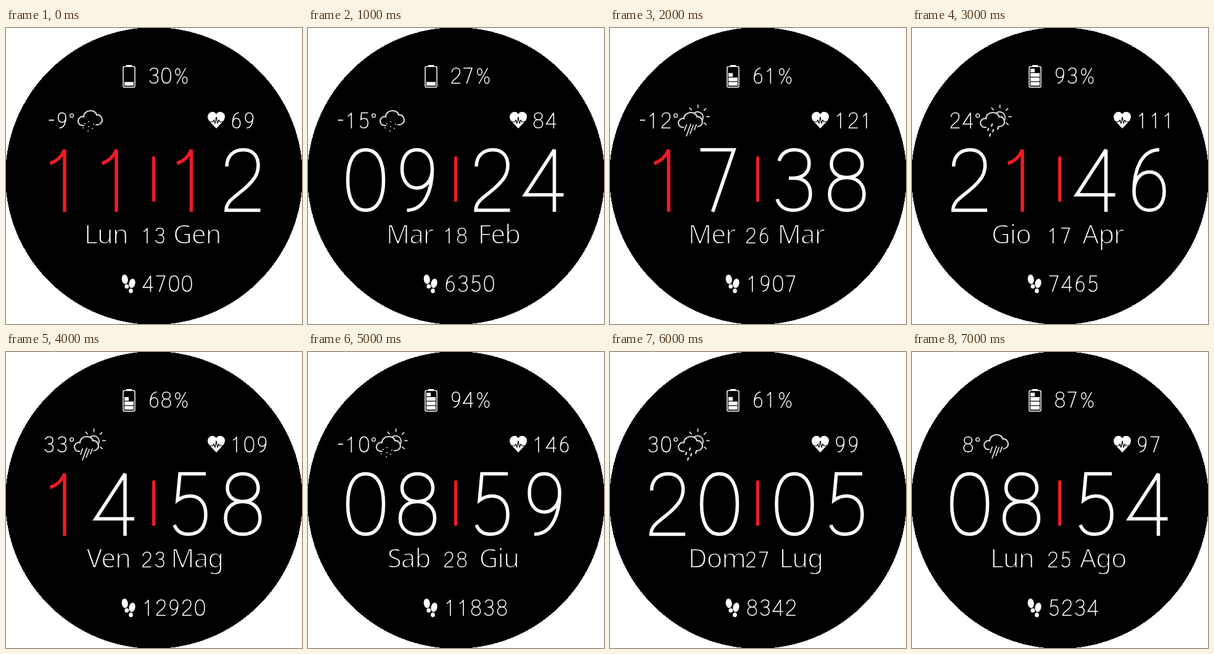
Recreate the animation shown at these times as an HTML page with a canvas. Size 480 by 480 pixels, loop 8 s.

```html
<!DOCTYPE html>
<html lang="it">
<head>
<meta charset="utf-8">
<style>
html, body { margin: 0; width: 100%; height: 100%; overflow: hidden; background: #fff; }
canvas { display: block; width: 480px; height: 480px; }
</style>
</head>
<body>
<canvas id="face" width="480" height="480"></canvas>
<script>
const ctx = document.getElementById('face').getContext('2d');
const WHITE = '#fff', BLACK = '#000', RED = '#ed1c24', GREY = '#d6d6d6';
const HOLD = 1000, RADIUS = 241;

// Thin digits, centred on x = 0, from y = 0 to y = 98
const DIGITS = [
  'M0 0C-20 0-29 20-29 49S-20 98 0 98 29 78 29 49 20 0 0 0Z',
  'M-22 22C-12 19-3 11 1.5 0V100.5',
  'M-26 27C-26 10-15 0 1 0C17 0 25 11 25 25C25 40 18 49 4 62C-12 76-27 83-27 98H28.5',
  'M-25 18C-21 6-12 0 0 0C15 0 24 9 24 22C24 37 14 46-2 46H-9H-1C16 46 26 55 26 71C26 88 15 98-2 98C-16 98-24 92-28 80',
  'M15.5 100.5V0L-32 73H30.5',
  'M25 0H-17L-21 43C-14 38-8 36-1 36C16 36 25 48 25 66C25 86 15 98-3 98C-15 98-22 93-26 83',
  'M-24 67C-24 86-14 98 1 98S25 86 25 67 15 36 1 36-24 48-24 67C-24 33-12 0 17 0',
  'M-31 0H23.5L-11 100.5',
  'M0 45C-15 45-25 36-25 23S-15 0 0 0 25 10 25 23 15 45 0 45C-18 45-28 57-28 72S-18 98 0 98 28 87 28 72 18 45 0 45Z',
  'M24 31C24 12 14 0-1 0S-25 12-25 31-15 62-1 62 24 50 24 31C24 65 12 98-17 98'
].map(d => new Path2D(d));

const CLOUD = new Path2D('M126 158C117 159 115 150 119 146 121 144 123 143 126 144 126 132 145 131 147 141 155 140 158 150 154 154 152 157 149 157 146 157');
const HEART = new Path2D('M341 163L329 150C324 142 330 136 335 136 338 136 340 138 341 140 342 138 344 136 347 136 353 136 358 142 353 150Z');
const PULSE = new Path2D('M329 152H335.5L337 149 339 155 341 144 343 155 345 149 346.5 152H353');
const RAIN = new Path2D('M130 154L127 163M137 153L130 172M141 155L136 168M146 154L143 162');
const DROPS = new Path2D('M136 153L135 156M130 160L129 163M138 162L137 165M146 158L145 161M133 169L132 172');
const SNOW = new Path2D('M128 155h.1M134 152h.1M142 156h.1M125 162h.1M134 160h.1M140 163h.1M133 167h.1');

const scene = (time, day, date, month, battery, temp, pulse, steps, sun, fall) =>
  ({ time, day, date, month, battery, temp, pulse, steps, sun, fall });

const SCENES = [
  scene('1112', 'Lun', 13, 'Gen', 30, -9, 69, 4700, false, SNOW),
  scene('0924', 'Mar', 18, 'Feb', 27, -15, 84, 6350, false, SNOW),
  scene('1738', 'Mer', 26, 'Mar', 61, -12, 121, 1907, true, RAIN),
  scene('2146', 'Gio', 17, 'Apr', 93, 24, 111, 7465, true, DROPS),
  scene('1458', 'Ven', 23, 'Mag', 68, 33, 109, 12920, true, RAIN),
  scene('0859', 'Sab', 28, 'Giu', 94, -10, 146, 11838, true, SNOW),
  scene('2005', 'Dom', 27, 'Lug', 61, 30, 99, 8342, true, DROPS),
  scene('0854', 'Lun', 25, 'Ago', 87, 8, 97, 5234, false, RAIN)
];

function stroke(path, color, width) {
  ctx.strokeStyle = color;
  ctx.lineWidth = width;
  ctx.stroke(path);
}

function ellipse(x, y, rx, ry, tilt = 0) {
  ctx.beginPath();
  ctx.ellipse(x, y, rx, ry, tilt, 0, Math.PI * 2);
}

function line(x1, y1, x2, y2, color, width) {
  ctx.beginPath();
  ctx.moveTo(x1, y1);
  ctx.lineTo(x2, y2);
  ctx.strokeStyle = color;
  ctx.lineWidth = width;
  ctx.stroke();
}

function digit(n, x, y, scale, weight, color = WHITE) {
  ctx.save();
  ctx.translate(x, y);
  ctx.scale(scale, scale);
  stroke(DIGITS[n], color, weight / scale);
  ctx.restore();
}

function number(value, x, y, pitch = 21, scale = 0.25) {
  [...String(value)].forEach((n, i) => digit(n, x + i * pitch, y, scale, 1.6));
}

// Row by row, so that the rim stays hard-edged
function drawDisc() {
  ctx.fillStyle = WHITE;
  ctx.fillRect(0, 0, 480, 480);
  ctx.fillStyle = BLACK;
  for (let y = 0; y < 480; y++) {
    const half = Math.round(Math.sqrt(RADIUS ** 2 - (y + 0.5 - 240) ** 2));
    ctx.fillRect(240 - half, y, half * 2, 1);
  }
}

function drawBattery(percent) {
  ctx.strokeStyle = ctx.fillStyle = WHITE;
  ctx.lineWidth = 1.5;
  ctx.beginPath();
  ctx.roundRect(190, 62.5, 19, 33.5, 2);
  ctx.stroke();
  ctx.fillRect(195, 60, 9, 2.5);
  const level = Math.round(percent / 25.5 * 2) / 2;
  for (let i = 0; i < level; i++) {
    ctx.fillRect(192, 87.5 - i * 7.2, level - i < 1 ? 7 : 15, 6);
  }
  number(percent, 240, 65, 20);
  ctx.lineWidth = 1.5;
  ellipse(278.5, 71, 3.7, 5.3);
  ctx.stroke();
  ellipse(290, 84.5, 3.7, 5.3);
  ctx.stroke();
  line(291.5, 65, 277, 90.5, WHITE, 1.5);
}

function drawSun() {
  ctx.strokeStyle = GREY;
  ctx.lineWidth = 2;
  ctx.beginPath();
  ctx.arc(142, 145, 9, -2.5, 0.9);
  ctx.stroke();
  for (let i = 0; i < 5; i++) {
    const a = -2.3 + i * 0.76, c = Math.cos(a), s = Math.sin(a);
    line(142 + c * 15, 144 + s * 15, 142 + c * 19, 144 + s * 19, GREY, 1.9);
  }
}

function drawWeather({ temp, sun, fall }) {
  const text = String(Math.abs(temp));
  const first = 91 - (text.length - 1) * 21;
  number(text, first, 137.5);
  if (temp < 0) line(first - 21.5, 149.5, first - 13, 149.5, WHITE, 1.8);
  ctx.lineWidth = 1.3;
  ctx.strokeStyle = WHITE;
  ellipse(106.5, 142, 2.9, 2.9);
  ctx.stroke();

  ctx.save();
  ctx.lineCap = 'round';
  if (sun) {
    drawSun();
    ctx.translate(-6, 3);
    ctx.fillStyle = BLACK;
    ctx.fill(CLOUD);
  }
  stroke(CLOUD, GREY, 2.2);
  if (fall === RAIN) stroke(RAIN, BLACK, 5);
  stroke(fall, GREY, fall === DROPS ? 2.4 : 1.9);
  ctx.restore();
}

function drawPulse(rate) {
  ctx.fillStyle = WHITE;
  ctx.fill(HEART);
  stroke(PULSE, BLACK, 1.2);
  number(rate, 373.5, 137.5);
}

function drawSteps(count) {
  ctx.fillStyle = WHITE;
  ellipse(192.7, 407.5, 5, 7.7, -0.15); ctx.fill();
  ellipse(195.8, 419, 3.4, 3.5); ctx.fill();
  ellipse(204.5, 414, 5, 7.7, 0.2); ctx.fill();
  ellipse(202.5, 426.3, 3.3, 3.8); ctx.fill();
  number(count, 230.5, 402, 21, 0.255);
}

function drawTime(time) {
  const centers = [93.5, 177.5, 299, 384];
  [...time].forEach((n, i) => digit(n, centers[i], 197.5, 1, 5.5, n === '1' ? RED : WHITE));
  ctx.fillStyle = RED;
  ctx.beginPath();
  ctx.roundRect(237, 208, 5, 74, 2.5);
  ctx.fill();
}

// A black outline over the white fill thins the letters to a light weight
function lightText(text, x, y) {
  ctx.fillStyle = WHITE;
  ctx.fillText(text, x, y);
  ctx.strokeStyle = BLACK;
  ctx.lineWidth = 1.8;
  ctx.strokeText(text, x, y);
}

function drawDate({ day, date, month }) {
  ctx.font = '300 43px "Noto Sans", "Open Sans", sans-serif';
  ctx.letterSpacing = '-1.5px';
  ctx.textAlign = 'left';
  lightText(day, 130.5 + ctx.measureText(day).actualBoundingBoxLeft, 350);
  ctx.textAlign = 'center';
  lightText(month, 309.5, 350);
  number(date, 228.5, 324.5, 21, 0.245);
}

function frame(now) {
  const current = SCENES[Math.floor(now / HOLD) % SCENES.length];
  ctx.miterLimit = 2.5;
  drawDisc();
  drawDate(current);
  drawBattery(current.battery);
  drawWeather(current);
  drawPulse(current.pulse);
  drawTime(current.time);
  drawSteps(current.steps);
}

const start = performance.now();
function tick() {
  frame(performance.now() - start);
  requestAnimationFrame(tick);
}
tick();
</script>
</body>
</html>
```
